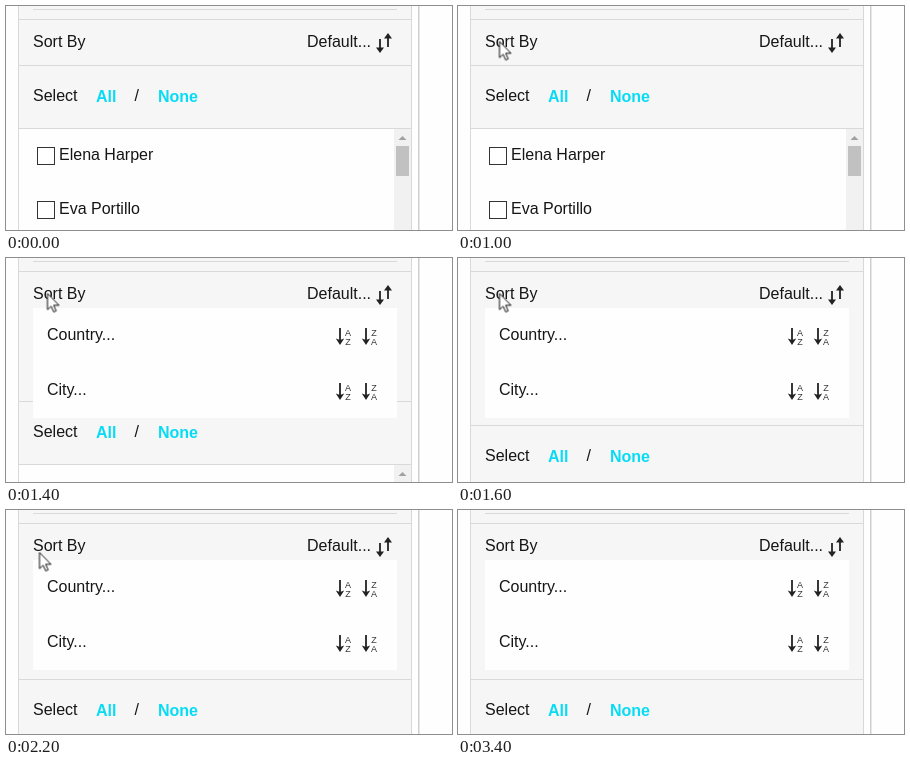
Animation of 446 by 224 pixels, one loop 4.2 s. Source, as an HTML page:

```html
<!DOCTYPE html>
<html lang="en">
<head>
<meta charset="utf-8">
<title>Sort panel</title>
<style>
  html, body { margin: 0; width: 100%; height: 100%; overflow: hidden; background: #fefefe; }
  svg { display: block; width: 446px; height: 224px; }
  text { font: 16px "Liberation Sans", Arial, sans-serif; fill: #161616; }
  .link { font-weight: bold; fill: #08dcf4; }
  .letter { font-size: 9px; fill: #333; }
  .panel { fill: #f6f6f6; }
  .rule { fill: #d9d9d9; }
  .paper { fill: #fefefe; }
  .box { fill: #fff; stroke: #333; }
  .arrow { fill: none; stroke: #222; stroke-width: 1.8; }
  .head { fill: #222; }
</style>
</head>
<body>
<svg viewBox="0 0 446 224">
  <defs>
    <g id="down">
      <path class="arrow" d="M0 0V13"/>
      <path class="head" d="M-4.2 10.5L0 12L4.2 10.5L0 17Z"/>
    </g>
    <g id="short">
      <path class="arrow" d="M0 0V10"/>
      <path class="head" d="M-4 8.5H4L0 14Z"/>
    </g>
  </defs>

  <rect class="panel" x="13" width="392" height="224"/>
  <rect class="rule" x="12" width="1" height="224"/>
  <rect class="rule" x="405" width="1" height="224"/>
  <rect x="412" width="1.5" height="224" fill="#cfcfcf"/>
  <rect class="rule" x="27" y="3" width="364" height="1"/>
  <rect class="rule" x="13" y="13" width="392" height="1"/>

  <text x="27" y="41">Sort By</text>
  <text x="301" y="41">Default...</text>
  <use href="#short" x="374" y="33"/>
  <use href="#short" transform="translate(382 41) scale(1 -1)"/>

  <g id="below">
    <rect class="rule" x="13" y="59" width="392" height="1"/>
    <text x="27" y="95">Select</text>
    <text class="link" x="90" y="96">All</text>
    <text x="128.5" y="95">/</text>
    <text class="link" x="152" y="96">None</text>
    <rect class="rule" x="13" y="122" width="392" height="1"/>
    <rect class="paper" x="13" y="123" width="375" height="110"/>
    <rect x="388" y="123" width="17" height="110" fill="#f1f1f1"/>
    <path d="M392.5 134L396.5 130L400.5 134Z" fill="#a0a0a0"/>
    <rect x="390" y="140" width="13" height="30" fill="#c1c1c1"/>
    <g id="rows"></g>
  </g>

  <g id="menu">
    <rect class="paper" x="27" y="50" width="364" height="110"/>
  </g>

  <path id="cursor" d="M0 0V16.2L3.7 12.8L6.2 18.5L8.7 17.4L6.2 11.8H11.5Z"
        fill="#fff" stroke="#111" stroke-linejoin="round"/>
</svg>
<script>
  const LOOP = 4200;
  const find = id => document.getElementById(id);

  const sortIcon = (x, y, top, bottom) => `
    <use href="#down" x="${x}" y="${y}"/>
    <text class="letter" text-anchor="middle" x="${x + 8}" y="${y + 7.5}">${top}</text>
    <text class="letter" text-anchor="middle" x="${x + 8}" y="${y + 16.5}">${bottom}</text>`;

  const option = (label, y) => `
    <text x="41" y="${y}">${label}</text>
    ${sortIcon(334, y - 12, "A", "Z")}${sortIcon(360, y - 12, "Z", "A")}`;

  const row = (label, y) => `
    <rect class="box" x="31.5" y="${y - 12.5}" width="17" height="17"/>
    <text x="53" y="${y}">${label}</text>`;

  find("rows").innerHTML = row("Elena Harper", 154) + row("Eva Portillo", 208);
  find("menu").innerHTML += option("Country...", 82) + option("City...", 137);

  // Each step holds its pose until the next one: [ms, x, y, opacity]
  function play(id, steps) {
    const frames = [...steps, [LOOP, ...steps.at(-1).slice(1)]].map(([ms, x, y, opacity]) => ({
      offset: ms / LOOP,
      transform: `translate(${x}px, ${y}px)`,
      opacity,
      easing: "steps(1, end)"
    }));
    const motion = find(id).animate(frames, { duration: LOOP, iterations: Infinity });
    motion.startTime = 0;
    return motion;
  }

  const motions = [
    play("below", [[0, 0, 0, 1], [1400, 0, 84, 1], [1600, 0, 108, 1], [1800, 0, 110, 1]]),
    play("menu", [[0, 0, 0, 0], [1400, 0, 0, 1]]),
    play("cursor", [
      [0, 10, 155, 0], [200, 10, 155, 1], [400, 27.5, 89.5, 1], [600, 33.5, 58.5, 1],
      [800, 41.5, 35.5, 1], [2200, 33.5, 42.5, 1], [2400, 22.5, 60.5, 1], [2600, 22.5, 60.5, 0]
    ])
  ];
  const start = document.timeline.currentTime ?? 0;
  motions.forEach(motion => { motion.startTime = start; });
</script>
</body>
</html>
```
